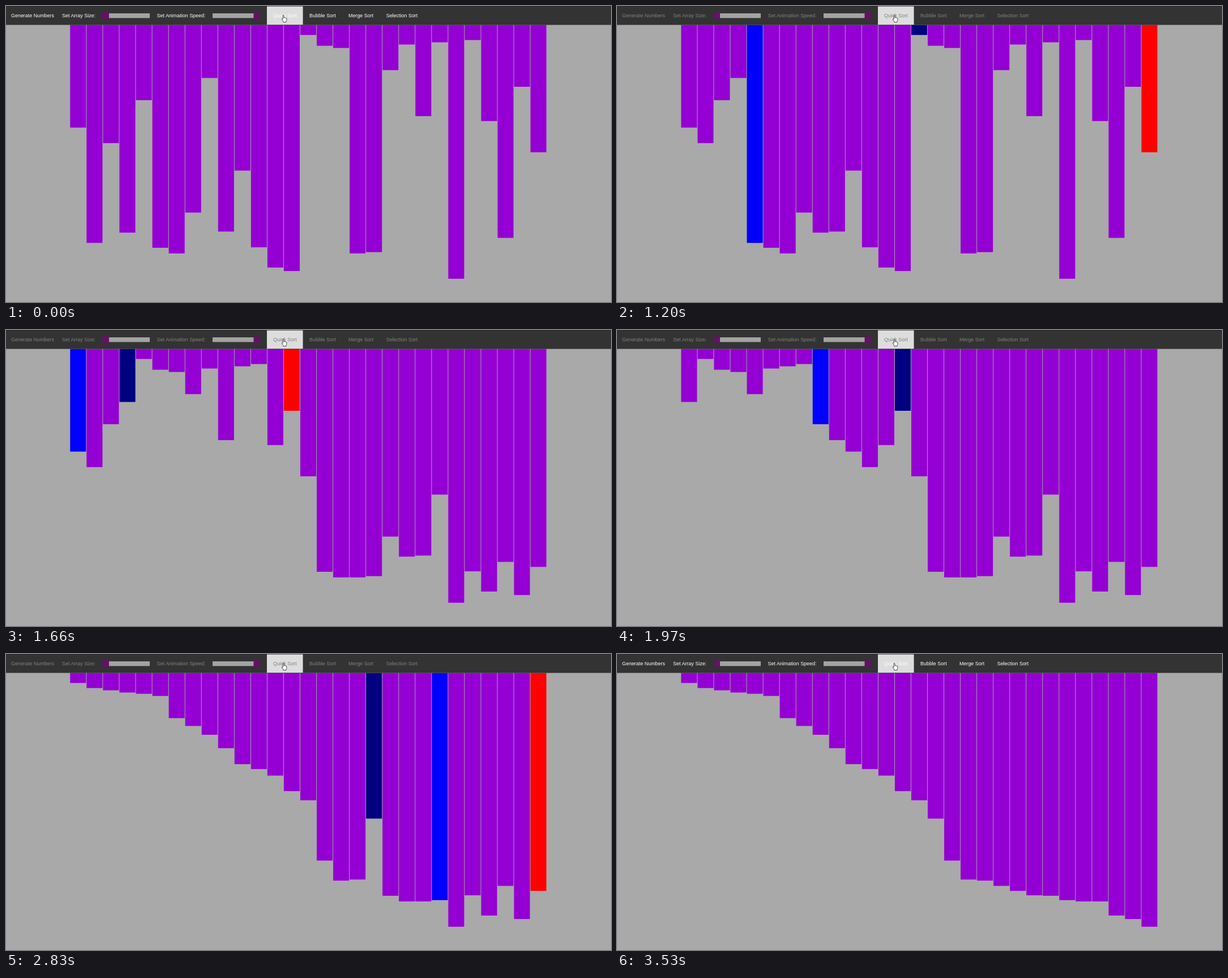
Recreate the animation shown at these times as an HTML page. Size 1069 by 524 pixels, loop 4070 ms.

```html
<!DOCTYPE html>
<html lang="en">
<head>
<meta charset="utf-8">
<title>Quick sort</title>
<style>
  html, body { margin: 0; width: 100%; height: 100%; overflow: hidden; background: #a9a9a9; }
  svg { display: block; width: 100%; height: 100%; }
  text { font: 8.95px "Liberation Sans", Arial, sans-serif; fill: #fff; }
  .busy text { fill: #808080; }
  .track { fill: #a3a3a3; }
  .thumb { fill: #690f69; }
</style>
</head>
<body>
<svg id="stage" viewBox="0 0 1069 524">
  <g id="bars"></g>
  <rect width="1069" height="33.5" fill="#333"/>
  <rect width="1069" height="1" fill="#262626"/>
  <rect x="461" y="0.7" width="63.6" height="32.3" fill="#ddd"/>
  <rect id="focus" x="461.5" y="1" width="62.5" height="31.5" fill="none" stroke="#fff"/>
  <rect class="track" x="170" y="13" width="84" height="8.3"/>
  <rect class="thumb" x="170" y="11.5" width="12" height="11"/>
  <rect class="track" x="365" y="13" width="84" height="8.3"/>
  <rect class="thumb" x="437.5" y="11.5" width="11.5" height="11"/>
  <g id="labels"></g>
  <circle id="press" cx="490" cy="17" r="7" fill="#ffee20" opacity=".75"/>
  <path d="M489.2 16.4q1.2-.9 1.9.3v4.2l.4-.6q1.3-.5 1.6.7.9-.7 1.6.4 1-.3 1.2.8v3.1l-1 1.7v1.7h-5v-1.4l-2.5-3.5q-.3-1.3 1-1.2l1 .9z"
        fill="#fff" stroke="#222" stroke-width=".8" stroke-linejoin="round"/>
</svg>
<script>
const LOOP = 4070, PRESS = 890, START = 990, DONE = 3530;
const TOP = 33.5;
// Times at which the picture refreshes
const REFRESH = [
  0, 890, 990, 1060, 1130, 1200, 1280, 1350,
  1450, 1510, 1590, 1660, 1740, 1820, 1890, 1970,
  2070, 2150, 2220, 2300, 2370, 2450, 2510,
  2610, 2690, 2770, 2850, 2930, 3010, 3090,
  3150, 3220, 3300, 3380, 3460, 3530
];
// Bottom edges of the unsorted bars
const START_BARS = [
  215.3, 419.4, 242.7, 401.2, 166.7, 428, 438, 365.7, 127.4, 399.3,
  291.4, 427.2, 463, 469.2, 51.3, 70.4, 74.3, 438, 435.7, 113.5,
  68.2, 195, 64.3, 482.8, 60.3, 203.7, 410.5, 143, 259
];
const LABELS = [
  [9, "Generate Numbers"], [99, "Set Array Size:"], [266.5, "Set Animation Speed:"],
  [472, "Quick Sort"], [536, "Bubble Sort"], [605, "Merge Sort"], [671.7, "Selection Sort"]
];
const COMPARE = 10, SWAP_HALF = 14, PACE = 1.029, SORT_START = 951.5;

const $ = id => document.getElementById(id);

function add(parent, tag, attrs, text = "") {
  const node = document.createElementNS("http://www.w3.org/2000/svg", tag);
  for (const key in attrs) node.setAttribute(key, attrs[key]);
  node.textContent = text;
  return parent.appendChild(node);
}

// Records every visible state of the sort with the moment it ends
function recordSort(input) {
  const list = [...input], states = [];
  let clock = 0;

  function hold(duration, marks) {
    clock += duration;
    states.push({ end: clock, list: [...list], marks });
  }

  function swap(a, b, pivot) {
    if (a === b) return hold(COMPARE, { [pivot]: "red", [a]: "navy" });
    hold(SWAP_HALF, { [pivot]: "red", [a]: "blue", [b]: "navy" });
    [list[a], list[b]] = [list[b], list[a]];
    hold(SWAP_HALF, { [pivot]: "red", [a]: "navy", [b]: "blue" });
  }

  function sort(low, high) {
    if (low >= high) return;
    let store = low;
    for (let j = low; j < high; j++) {
      hold(COMPARE, { [store]: "black", [high]: "red" });
      if (list[j] < list[high]) swap(store++, j, high);
    }
    swap(store, high, high);
    sort(low, store - 1);
    sort(store + 1, high);
  }

  sort(0, list.length - 1);
  states.push({ end: Infinity, list: [...list], marks: {} });
  return states;
}

const states = recordSort(START_BARS);
const bars = START_BARS.map((_, i) =>
  add($("bars"), "rect", { x: 113.3 + 29.05 * i, y: TOP, width: 28.1 }));
LABELS.forEach(([x, text]) => add($("labels"), "text", { x, y: 19.6 }, text));

function stateAt(time) {
  if (time < START) return { list: START_BARS, marks: {} };
  if (time >= DONE) return states[states.length - 1];
  const progress = (time - SORT_START) * PACE;
  return states.find(state => progress < state.end);
}

function draw(time) {
  const { list, marks } = stateAt(time);
  bars.forEach((bar, i) => {
    bar.setAttribute("height", list[i] - TOP);
    bar.setAttribute("fill", marks[i] || "#9400d3");
  });
  const pressed = time >= PRESS && time < START;
  $("press").style.display = $("focus").style.display = pressed ? "" : "none";
  $("labels").classList.toggle("busy", time >= START && time < DONE);
}

const origin = performance.now();
let shown = -1;
function tick() {
  const time = (performance.now() - origin) % LOOP;
  const step = REFRESH.filter(t => t <= time).pop();
  if (step !== shown) draw(shown = step);
  requestAnimationFrame(tick);
}
tick();
</script>
</body>
</html>
```
